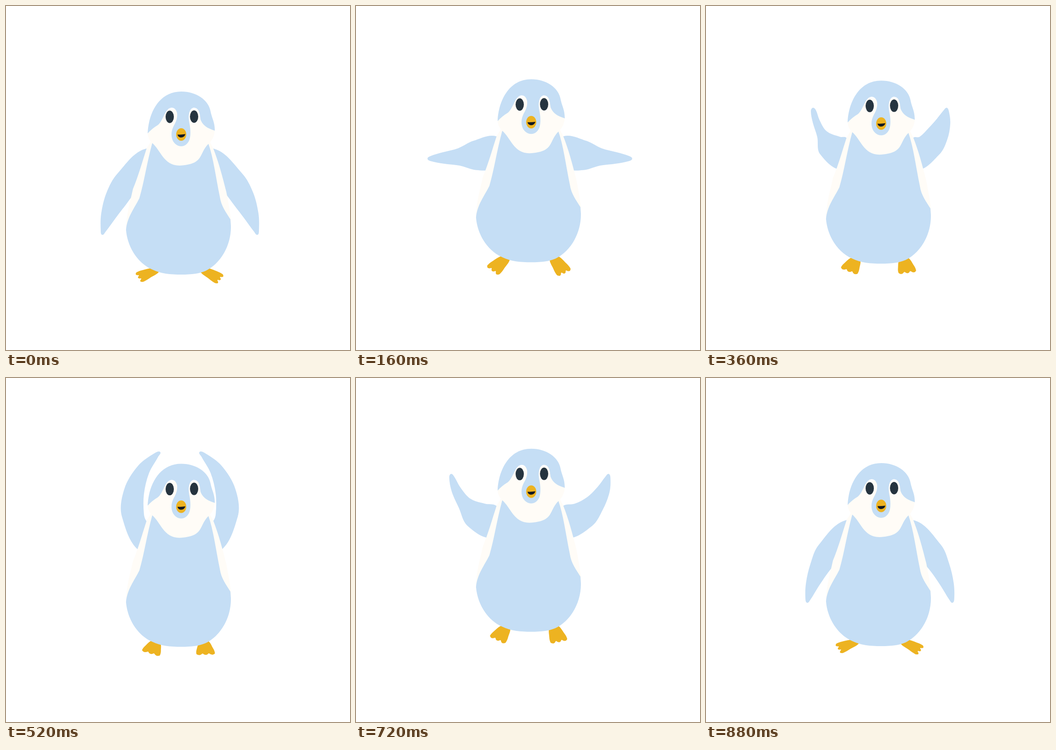
Recreate the animation shown at these times as an HTML page. Size 748 by 748 pixels, loop 920 ms.

```html
<!DOCTYPE html>
<html lang="en">
<head>
<meta charset="utf-8">
<title>Flapping penguin</title>
<style>
  html, body { margin: 0; width: 100%; height: 100%; overflow: hidden; background: #fff; }
  svg { display: block; width: 100vw; height: 100vh; }
  .blue { fill: #c5def5; }
  .white { fill: #fffcf7; }
  .gold { fill: #edb321; }
  .dark { fill: #26343f; }
</style>
</head>
<body>
<svg viewBox="0 0 748 748">
  <g id="bird">
    <g transform="translate(378 0) scale(-1 1)">
      <path id="wingL" class="blue"/>
      <path id="footL" class="gold"/>
    </g>
    <g transform="translate(378 0)">
      <path id="wingR" class="blue"/>
      <path id="footR" class="gold"/>
    </g>
    <path class="white" d="M318 290L306 309C296 340 287 372 276 398C269 430 261 455 261 487L300 530H450L489 485V465C487 445 483 425 479 404C471 372 462 338 450 308L440 290Z"/>
    <path class="blue" d="M318 298C306 342 301 380 290 418C279 440 263 460 261 487C264 524 286 559 318 573C336 582 358 584 381 584C404 584 420 582 434 576C467 560 490 520 489 478L488 464C479 449 468 436 465 415C456 371 451 330 440 299Z"/>
    <path class="white" d="M308 270V278Q309 289 318 298C336 313 343 347 377 347C432 344 418 322 440 300Q453 288 454 270L430 225H335Z"/>
    <path class="blue" d="M308 277C310 232 333 186 381 186C413 186 441 204 445 230C448 245 454 252 454 271C438 266 428 260 423 247C422 235 420 221 408 221C398 223 396 238 398 251C402 268 402 284 398 293C394 301 388 305 381 305C373 305 365 299 362 291C358 280 360 270 365 260C371 250 373 241 372 233C370 225 366 221 360 221C345 222 343 249 330 259Q318 266 308 277Z"/>
    <ellipse class="dark" cx="356" cy="241" rx="9" ry="13.5"/>
    <ellipse class="dark" cx="409" cy="240.5" rx="9" ry="13.5"/>
    <ellipse class="gold" cx="381" cy="279.3" rx="11" ry="13.6"/>
    <path fill="#101820" d="M373 279.5Q382 280 390 278.5Q388 286 380 286Q374 285 373 279.5Z"/>
  </g>
</svg>
<script>
const LOOP = 920, STEP = 40;

// Body height: [ms, offset]
const hops = [[0, 0], [250, -38], [516, 0.6], [790, -38.5], [890, 0], [920, 0]];

// Wing poses; angles in degrees, positive is down. "slim" thins the left wing.
const poses = [
  { t: 0,   turn: 46,  bend: 30,  reach: 173, girth: 50, slim: 0 },
  { t: 160, turn: 7,   bend: -5,  reach: 137, girth: 38, slim: 0 },
  { t: 360, turn: -38, bend: -44, reach: 122, girth: 48, slim: 0.5 },
  { t: 520, turn: -62, bend: -82, reach: 210, girth: 44, slim: 0 },
  { t: 640, turn: -50, bend: -70, reach: 151, girth: 42, slim: 0.45 },
  { t: 800, turn: 8,   bend: -30, reach: 145, girth: 45, slim: 0 },
  { t: 880, turn: 48,  bend: 30,  reach: 161, girth: 43, slim: 0 }
];

const $ = id => document.getElementById(id);
const mix = (a, b, k) => a + (b - a) * k;
const polar = (deg, r) => {
  const a = deg * Math.PI / 180;
  return [r * Math.cos(a), r * Math.sin(a)];
};
const add = (a, b, k = 1) => [a[0] + b[0] * k, a[1] + b[1] * k];

function lift(t) {
  const i = hops.findIndex(h => h[0] > t);
  const [t0, a] = hops[i - 1], [t1, b] = hops[i];
  const u = (t - t0) / (t1 - t0);
  return mix(a, b, u * u * (3 - 2 * u));
}

// Cyclic Hermite curve through the poses
function tween(key, t) {
  const n = poses.length;
  const pose = i => poses[(i + n) % n];
  const at = i => pose(i).t + LOOP * Math.floor(i / n);
  const val = i => pose(i)[key];
  const slope = i => (val(i + 1) - val(i - 1)) / (at(i + 1) - at(i - 1));
  let i = n - 1;
  while (at(i) > t) i--;
  const h = at(i + 1) - at(i), u = (t - at(i)) / h, w = 1 - u;
  return val(i) * w * w * (1 + 2 * u) + val(i + 1) * u * u * (1 + 2 * w)
    + h * u * w * (slope(i) * w - slope(i + 1) * u);
}

// Smooth closed path; handles follow the length of each side
function smooth(pts) {
  const n = pts.length, p = i => pts[(i + n) % n];
  const dir = i => {
    const d = add(p(i + 1), p(i - 1), -1), l = Math.hypot(...d) || 1;
    return [d[0] / l, d[1] / l];
  };
  const f = q => q.map(v => v.toFixed(2)).join(" ");
  let d = "M" + f(p(0));
  for (let i = 0; i < n; i++) {
    const a = p(i), b = p(i + 1);
    const k = Math.hypot(...add(b, a, -1)) * 0.34;
    d += `C${f(add(a, dir(i), k))} ${f(add(b, dir(i + 1), -k))} ${f(b)}`;
  }
  return d + "Z";
}

// A tapering arc that grows out of the shoulder
function wing({ turn, bend, reach }, girth) {
  const spine = s => {
    const half = bend * s * Math.PI / 360;
    const chord = Math.abs(half) < 1e-6 ? 1 : Math.sin(half) / half;
    return add([86, 348], polar(turn + bend * s / 2, reach * s * chord));
  };
  const base = 34 + polar(turn, 30)[0];
  const widths = [[0.25, base], [0.5, girth], [0.75, girth * 0.65], [0.95, 11]];
  const edge = side => widths.map(([s, w]) =>
    add(spine(s), polar(turn + bend * s + 90 * side, w / 2)));
  return smooth([[46, 342], [73, 310], ...edge(-1), spine(1), ...edge(1).reverse(), [80, 380]]);
}

// Three round toes; the foot turns down and spreads as the wings rise
function foot(turn, lean) {
  const h = 54 - 0.44 * turn - 0.0022 * turn * turn;
  const len = 42 - Math.max(0, h - 54) * 0.7, width = 16 + 0.36 * h;
  const at = (v, u) => {
    const root = [8 - 16 * v, 4 * v - 2];
    const toe = add(polar(h * lean, len), polar(h * lean + 98, width), v - 0.5);
    return add([51.5, 572], [mix(root[0], toe[0], u), mix(root[1], toe[1], u)]);
  };
  const toes = Array.from({ length: 13 }, (_, i) =>
    at(i / 12, 0.93 + 0.11 * Math.abs(Math.sin(i * Math.PI / 4))));
  return smooth([at(0, 0), at(-0.07, 0.6), ...toes, at(1.07, 0.6), at(1, 0)]);
}

function draw(ms) {
  const t = Math.floor((ms % LOOP) / STEP) * STEP;
  const now = {};
  for (const key of ["turn", "bend", "reach", "girth", "slim"]) now[key] = tween(key, t);
  const set = (id, d) => $(id).setAttribute("d", d);
  $("bird").setAttribute("transform", `translate(0 ${lift(t).toFixed(2)})`);
  set("wingL", wing(now, now.girth * (1 - now.slim)));
  set("wingR", wing(now, now.girth));
  set("footL", foot(now.turn, 0.9));
  set("footR", foot(now.turn, 1.1));
}

let start;
function tick(now) {
  start ??= now;
  draw(now - start);
  requestAnimationFrame(tick);
}
draw(0);
requestAnimationFrame(tick);
</script>
</body>
</html>
```
